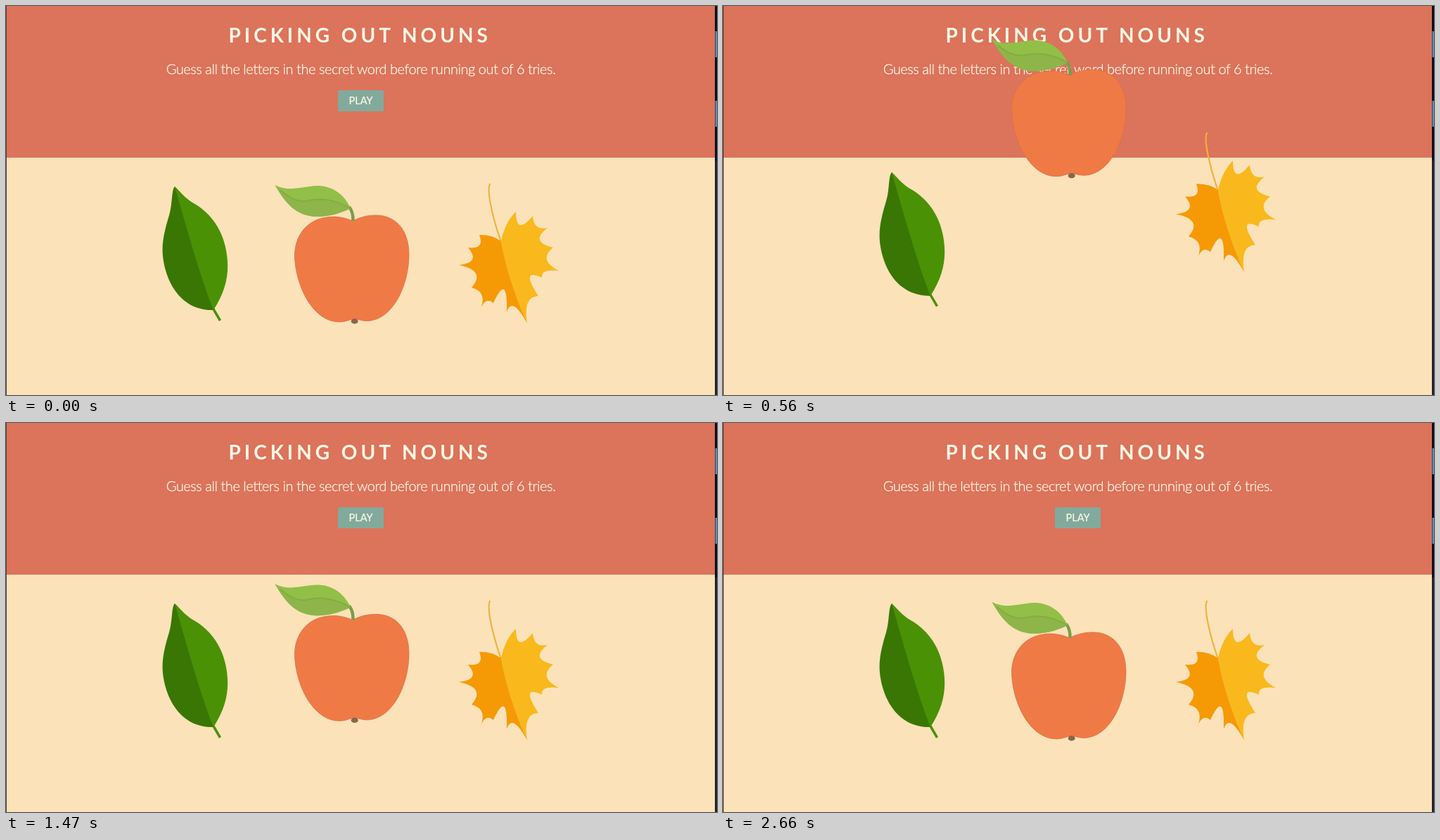
These frames come from a looping animation (1011x554 px, 2730 ms). An HTML page:

```html
<!DOCTYPE html>
<html lang="en">
<head>
<meta charset="utf-8">
<title>Word game</title>
<style>
  html, body { margin: 0; width: 100%; height: 100%; overflow: hidden; background: #fbe2b9; }
  svg { display: block; width: 100%; height: 100%; }
  text { font-family: Lato, sans-serif; fill: #fff8e6; }
  .title { font-size: 28px; font-weight: 700; letter-spacing: 5px; }
  .intro { font-size: 20px; font-weight: 300; letter-spacing: -.45px; text-anchor: middle; stroke: #fff8e6; stroke-width: .3px; }
  .label { font-size: 14.5px; text-anchor: middle; stroke: #fff8e6; stroke-width: .2px; }
</style>
</head>
<body>
<svg viewBox="0 0 1011 554">
  <rect width="1011" height="554" fill="#fbe2b9"/>
  <rect width="1011" height="216" fill="#dc735b"/>
  <text class="title" x="316.5" y="52">PICKING OUT NOUNS</text>
  <text class="intro" x="504.5" y="96.5">Guess all the letters in the secret word before running out of 6 tries.</text>
  <rect x="472" y="120" width="65" height="30" rx="1.5" fill="#82aa9c"/>
  <text class="label" x="504.5" y="140">PLAY</text>

  <g id="leaf">
    <path d="M294 430L304.500 448" stroke="#4a9106" stroke-width="3.500"/>
    <path fill="#4a9106" d="M240 257C247 263 254 274 267 281C290 294 306 316 312 343C319 375 315 402 295 433L250 400Z"/>
    <path fill="#3a7604" d="M240 257C235 262 237 282 232 298C226 318 221 337 223 356C226 386 244 434 295 433Q277 390 240 257Z"/>
  </g>

  <g id="apple">
    <path fill="#ef7a45" stroke="#dc7048" stroke-width=".8" d="M493 306C478 300 466 299 455 301C427 305 410 328 410.500 357C412 400 437 450 474 450C484 450 488 446 496 446C502 446 506 449 515 448.500C552 446 573 395 573 354C573 320 555 298 526 298C513 298 503 301 493 306Z"/>
    <ellipse cx="495.700" cy="449" rx="5" ry="3.700" fill="#8a6648"/>
    <path fill="none" stroke="#7c9c49" stroke-width="4.500" d="M493.500 306Q494 294 488 286"/>
    <path fill="#92bf48" d="M382.500 255C400 264 415 259 432 257C455 253 478 262 490 288C470 298 455 300 440 300C412 298 398 282 382.500 255Z"/>
    <path fill="#8db54a" d="M382.500 255C398 270 410 278 425 278C445 273 465 274 490 288C470 298 455 300 440 300C412 298 398 282 382.500 255Z"/>
    <path fill="none" stroke="#85ac40" stroke-width="2" d="M390 262C400 271 410 278 425 278C445 273 465 274 490 288"/>
  </g>

  <g id="maple">
    <path fill="none" stroke="#f1b23a" stroke-width="2.200" d="M688.500 253C682 262 694 308 704 336"/>
    <path id="light" fill="#f9b91c"/>
    <path id="dark" fill="#f59a05"/>
  </g>

  <rect width="1" height="554" fill="#5c3a32"/>
  <rect x="1008" width="3" height="554" fill="#23222b"/>
  <rect x="1008" width="3" height="220" fill="#0d0c1c"/>
  <rect x="1008.500" y="36" width="2.500" height="37" fill="#5b8db0"/>
  <rect x="1008.500" y="135" width="2.500" height="37" fill="#5b8db0"/>
</svg>
<script>
const LOOP = 2730, STEP = 70, START = 70;
const byId = id => document.getElementById(id);

// Points alternate between tips and dips; each arc passes through its dip.
function scallop(text) {
  const points = text.split(' ').map(p => p.split(',').map(Number));
  let path = `M${points[0]}`;
  for (let i = 2; i < points.length; i += 2) {
    const [from, dip, to] = points.slice(i - 2, i + 1);
    path += `Q${dip.map((d, k) => 2 * d - (from[k] + to[k]) / 2)} ${to}`;
  }
  return path + 'Z';
}

const rib = '741,452 718,391 704,335';
byId('light').setAttribute('d', scallop(
  '704,335 712,311 725,293 731,312 749,299 755,314 770,316 759,333 778,344 ' +
  '769,361 786,377 767,378 762,387 745,386 757,413 742,423 ' + rib));
byId('dark').setAttribute('d', scallop(
  '704,335 690,328 673,326 673,341 657,344 663,361 644,369 668,381 662,401 ' +
  '677,413 673,436 682,421 693,423 708,404 712,436 723,428 ' + rib));

// A fast fall and a slow settle, both easing out.
const easeOut = x => Math.max(0, 1 - x) ** 2;
const heightAt = t => t < 0 ? 0 : 495 * easeOut(t / 880) + 180 * easeOut(t / 2250);

const pace = { leaf: 3.05, maple: 1.7, apple: 1 };

function draw(ms) {
  const t = Math.floor((ms % LOOP) / STEP) * STEP - START;
  for (const id in pace)
    byId(id).setAttribute('transform', `translate(0 ${-heightAt(t * pace[id])})`);
}

const begin = performance.now();
function tick() {
  draw(performance.now() - begin);
  requestAnimationFrame(tick);
}
tick();
</script>
</body>
</html>
```
